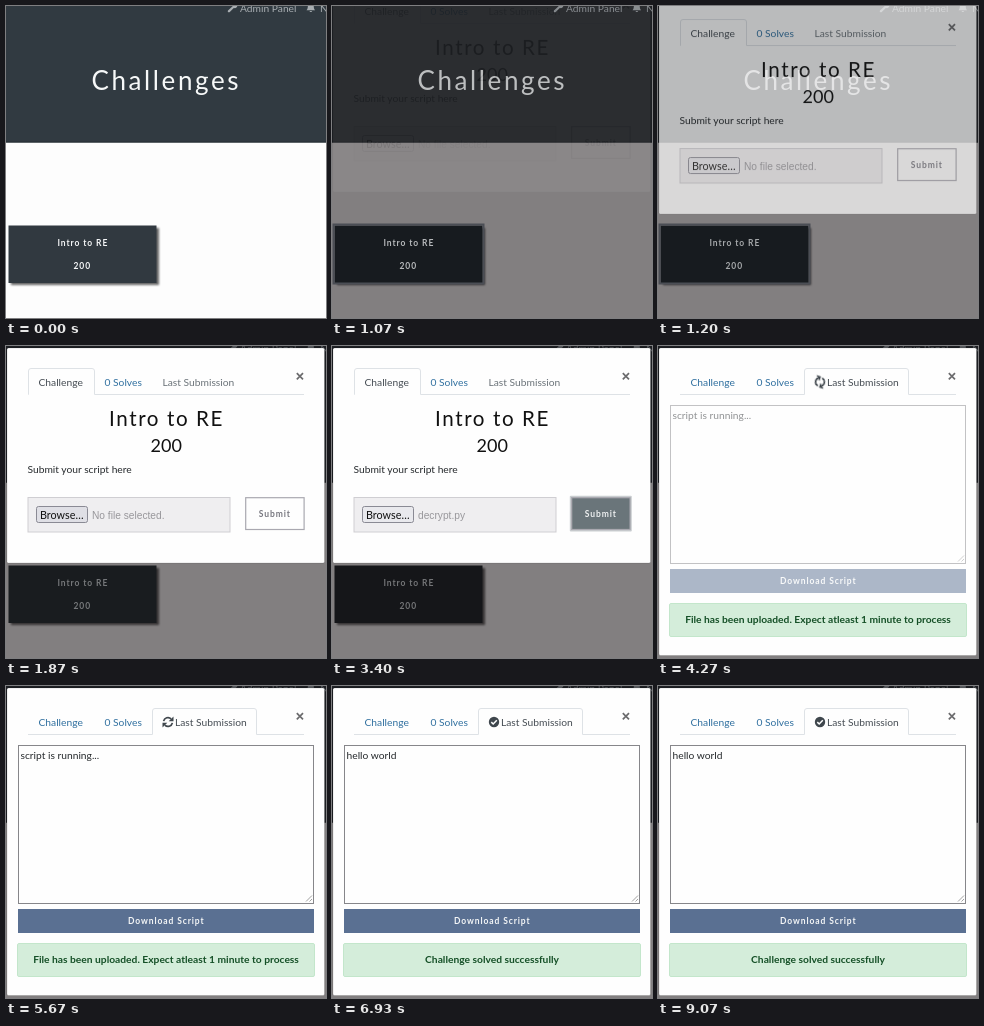
An HTML page that plays this animation: 320 px wide and 312 px high, repeating every 9.19 s.

```html
<!DOCTYPE html>
<html lang="en">
<head>
<meta charset="utf-8">
<title>Challenges</title>
<style>
  html, body { margin: 0; width: 100%; height: 100%; overflow: hidden; background: #fdfdfd; }
  svg { display: block; width: 320px; height: 312px; }
  text { font: 10.25px Lato, sans-serif; fill: #25292c; white-space: pre; }
  .head { font-size: 26px; letter-spacing: 2.6px; fill: #f6f8f8; }
  .title { font-size: 20.6px; letter-spacing: 1.6px; fill: #111; }
  .value { font-size: 18px; fill: #111; }
  .btn { font-size: 8.5px; font-weight: 700; letter-spacing: .9px; fill: #f4f6f7; }
  .file { font: 10.2px "Liberation Sans", Arial, sans-serif; fill: #98979b; }
  .nav text { fill: #a9aeb2; }
  .nav path { fill: #a9aeb2; }
  .link { fill: #2f6f9f; }
  .muted { fill: #6a7278; }
  .active { fill: #454c53; }
  .alert { font-weight: 700; fill: #155027; text-anchor: middle; }
  .line { fill: none; stroke: #dee2e6; }
</style>
</head>
<body>
<svg viewBox="0 0 320 312">
  <defs>
    <filter id="soft" x="-10%" y="-10%" width="120%" height="130%"><feGaussianBlur stdDeviation="1.2"/></filter>
    <g id="arrow">
      <path d="M-4.4 -.9A4.5 4.5 0 0 1 3.1 -3.2" fill="none" stroke="#3f464c" stroke-width="1.7"/>
      <path d="M5.5 -5.5V-.7H.7Z" fill="#3f464c"/>
    </g>
  </defs>

  <!-- page -->
  <rect width="320" height="312" fill="#fdfdfd"/>
  <rect width="320" height="136.5" fill="#313a41"/>
  <rect y="135.5" width="320" height="1" fill="#272f35"/>
  <rect x="5" y="222" width="148" height="57" fill="#000" opacity=".6" filter="url(#soft)"/>
  <rect id="tile" x="2.5" y="219.5" width="148" height="57.5" fill="#313940"/>
  <rect id="ring" x="1.5" y="218.5" width="150" height="59" fill="none" stroke="#8f9ca8" stroke-width="2"/>
  <rect id="shade" width="320" height="312" fill="#080305"/>

  <g id="labels">
    <g class="nav">
      <path d="M222 4.6L226.6 .2C226 -2 227.5 -3.6 229.6 -3.4L228.4 -1.5L229.6 -.2L231.4 -1.4C231.6 1.4 229.8 2.6 227.8 2L223.5 6.2C222.2 6.8 221.3 5.7 222 4.6Z"/>
      <text x="234" y="5.6">Admin Panel</text>
      <path d="M300.5 4.3C302 3 301.6 1 302 -.6C302.6 -2.6 307 -2.6 307.6 -.6C308 1 307.6 3 309.1 4.3ZM303.5 5H306.2A1.4 1.4 0 0 1 303.5 5Z"/>
      <text x="314" y="5.6">N</text>
    </g>
    <text class="head" x="85.5" y="84">Challenges</text>
    <text class="btn" x="51.5" y="240">Intro to RE</text>
    <text class="btn" x="67.5" y="263">200</text>
  </g>

  <g id="modal">
    <rect id="short" x="1" y="2" width="317.5" height="215" rx="1.5" fill="#fefefe" stroke="#0003" stroke-width=".6"/>
    <rect id="tall" x="1" y="2" width="317.5" height="307.5" rx="1.5" fill="#fefefe" stroke="#0003" stroke-width=".6"/>
    <path d="M290.8 27.2L297 33.4M297 27.2L290.8 33.4" stroke="#6b6b6d" stroke-width="1.7"/>

    <g id="tabsA">
      <path class="line" d="M22 48.5H22.5V25Q22.5 22.5 25 22.5H86Q88.5 22.5 88.5 25V48.5H298"/>
      <text class="active" x="32.5" y="39.5">Challenge</text>
      <text class="link" x="98.5" y="39.5">0 Solves</text>
      <text class="muted" x="156.5" y="39.5">Last Submission</text>
    </g>
    <g id="tabsB">
      <path class="line" d="M22 48.5H146.5V25Q146.5 22.5 149 22.5H248Q250.5 22.5 250.5 25V48.5H298"/>
      <text class="link" x="32.5" y="39.5">Challenge</text>
      <text class="link" x="98.5" y="39.5">0 Solves</text>
      <text class="active" x="169" y="39.5">Last Submission</text>
      <g transform="translate(162 36)">
        <g id="sync"><g id="spin"><use href="#arrow"/><use href="#arrow" transform="rotate(180)"/></g></g>
        <g id="check">
          <circle r="5.2" fill="#3f474d"/>
          <path d="M-2.7 .1L-.8 2L2.8 -1.7" fill="none" stroke="#fff" stroke-width="1.5"/>
        </g>
      </g>
    </g>

    <g id="paneA">
      <text class="title" x="103" y="79.5">Intro to RE</text>
      <text class="value" x="144.5" y="106">200</text>
      <text x="21.5" y="126.5">Submit your script here</text>
      <rect x="22" y="151.5" width="202" height="34.5" fill="#efeef0" stroke="#cfced2"/>
      <rect id="browse" x="30.5" y="160.5" width="51" height="16" rx="2" fill="#e9e9ed" stroke="#8a8a94"/>
      <text x="34" y="172.5" style="font-size:10.8px;fill:#111">Browse…</text>
      <text id="none" class="file" x="86" y="172.5">No file selected.</text>
      <text id="name" class="file" x="86" y="172.5">decrypt.py</text>
      <rect id="focus" x="237.8" y="149.8" width="62" height="35.6" rx="1" fill="#c9cdd0"/>
      <rect id="submit" x="239.7" y="151.7" width="58.4" height="31.8" fill="#fefefe" stroke="#a9a8b0" stroke-width="1.2"/>
      <text id="send" class="btn" x="252.8" y="171">Submit</text>
    </g>

    <g id="paneB">
      <rect x="12.5" y="59.5" width="295" height="158" fill="#fefefe" stroke="#86868a"/>
      <path d="M300 215.5L306 209.5M303.5 215.5L306 213" stroke="#8a8a8a" stroke-width=".8"/>
      <text id="running" x="14.5" y="73">script is running...</text>
      <text id="output" x="14.5" y="73">hello world</text>
      <rect x="12" y="223" width="296" height="24" fill="#5a7092"/>
      <text class="btn" x="122" y="238.2">Download Script</text>
    </g>
    <g id="notice">
      <rect x="11.5" y="257.5" width="297" height="33" rx="1.5" fill="#d4edda" stroke="#c3e6cb"/>
      <text id="sent" class="alert" x="160" y="277">File has been uploaded. Expect atleast 1 minute to process</text>
      <text id="solved" class="alert" x="160" y="277">Challenge solved successfully</text>
    </g>
  </g>
</svg>
<script>
const LOOP = 9190, STEP = 200 / 3;
const OPEN = 1000, PICK = 2200, HOVER = 3066, TAB = 4000, SWAP = 4133, DONE = 6800;
const clips = [];

// keys: [time, value] pairs; the outer values are held to both ends
function track(id, prop, keys, easing = 'linear') {
  const all = [[0, keys[0][1]], ...keys, [LOOP, keys[keys.length - 1][1]]];
  const clip = document.getElementById(id).animate(
    all.map(([t, v]) => ({ offset: t / LOOP, [prop]: v, easing })),
    { duration: LOOP, fill: 'both' });
  clip.pause();
  clips.push(clip);
}
const fade = (id, ...keys) => track(id, 'opacity', keys);
const jump = (id, prop, ...keys) => track(id, prop, keys, 'steps(1, end)');
const show = (id, at) => jump(id, 'opacity', [0, 0], [at, 1]);
const hide = (id, at) => jump(id, 'opacity', [0, 1], [at, 0]);

// page
track('tile', 'fill', [[260, '#313940'], [600, '#26343a'], [1130, '#26343a'],
  [1400, '#2b363a'], [PICK, '#2b363a'], [2670, '#222b2f']]);
jump('ring', 'opacity', [0, 0], [800, 1], [1400, 0]);
fade('shade', [860, 0], [1050, .5]);
fade('labels', [860, 1], [1060, .72], [1130, .72], [1400, .42]);

// dialog
fade('modal', [OPEN, 0], [1068, .07], [1200, .7], [1330, 1]);
track('modal', 'transform', [[OPEN, -50], [1068, -31], [1200, -9], [1330, -1.5], [1400, 0]]
  .map(([t, y]) => [t, `translate(0px, ${y}px)`]));
jump('browse', 'fill', [0, '#e9e9ed'], [1600, '#dfdfe5'], [PICK, '#e9e9ed']);
hide('none', PICK);
show('name', PICK);
track('submit', 'fill', [[HOVER, '#fefefe'], [3330, '#6a757a']]);
track('send', 'fill', [[HOVER, '#77777f'], [3330, '#eef0f1']]);
fade('focus', [3260, 0], [3390, 1]);

// tab change
hide('tabsA', TAB);
show('tabsB', TAB);
fade('paneA', [3930, 1], [4080, 0]);
hide('short', SWAP);
show('tall', SWAP);
show('notice', SWAP);
fade('paneB', [4200, 0], [4335, 1]);
track('spin', 'transform', [0, LOOP].map(t => [t, `rotate(${(t - 5667) * .18}deg)`]));

// result
for (const id of ['sync', 'running', 'sent']) hide(id, DONE);
for (const id of ['check', 'output', 'solved']) show(id, DONE);

const start = performance.now();
function draw() {
  const t = (performance.now() - start) % LOOP;
  const now = Math.floor((t + 4) / STEP) * STEP + 1;
  for (const clip of clips) clip.currentTime = Math.min(now, LOOP - 1);
  requestAnimationFrame(draw);
}
draw();
</script>
</body>
</html>
```
